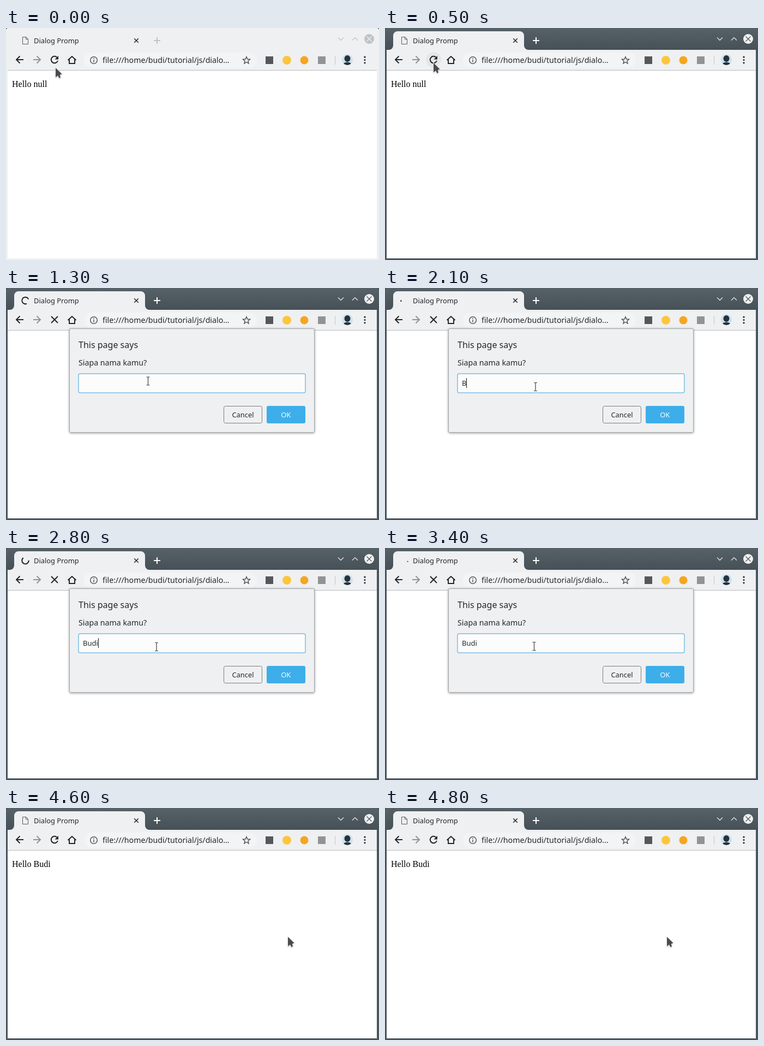
These frames come from a looping animation (684x425 px, 6000 ms). An HTML page:

```html
<!DOCTYPE html>
<html lang="id">
<head>
<meta charset="utf-8">
<title>Dialog prompt</title>
<style>
  html, body { margin: 0; width: 100%; height: 100%; overflow: hidden; background: #3a4046; }
  svg { display: block; width: 684px; height: 425px; }
  text { font-family: "Noto Sans", sans-serif; font-size: 13px; fill: #232629; white-space: pre; }
  .line { fill: none; stroke: #232629; stroke-width: 2; }
  .page { font-family: "Liberation Serif", serif; font-size: 16px; fill: #000; }
  #dialog > rect:first-child { filter: drop-shadow(0 1px 2px rgba(0, 0, 0, .4)); }
</style>
</head>
<body>
<svg viewBox="0 0 684 425">
  <defs>
    <linearGradient id="bar" x2="0" y2="1">
      <stop stop-color="#566168"/><stop offset="1" stop-color="#475057"/>
    </linearGradient>
    <clipPath id="face"><circle cx="626" cy="58" r="10"/></clipPath>
  </defs>

  <!-- window frame -->
  <path id="frame" d="M0 425V4Q0 0 4 0H680Q684 0 684 4V425Z"/>
  <g id="activeBar">
    <path d="M0 40V4Q0 0 4 0H680Q684 0 684 4V40Z" fill="url(#bar)"/>
    <path d="M7 40A8 8 0 0 0 15 32V14A8 8 0 0 1 23 6H247A8 8 0 0 1 255 14V32A8 8 0 0 0 263 40Z" fill="#eff0f1"/>
  </g>
  <rect x="3" y="40" width="677" height="37" fill="#eff0f1"/>
  <rect x="3" y="77" width="677" height="1" fill="#b8babc"/>
  <rect x="3" y="78" width="677" height="344" fill="#fff"/>

  <!-- tab -->
  <path id="pageIcon" class="line" style="stroke:#55595c;stroke-width:1" d="M30.500 16.500H37L40.500 20.500V29.500H30.500ZM36.500 16.500V20.500H40.500"/>
  <path id="spinner" class="line"/>
  <text x="51" y="28" style="font-size:12.85px">Dialog Promp</text>
  <path class="line" style="stroke-width:1.500" d="M235.200 19.200l7.600 7.600m0-7.600l-7.600 7.600"/>
  <path id="plus" class="line" d="M271 23H283M277 17V29"/>

  <!-- window buttons -->
  <path id="chevrons" class="line" style="stroke-width:1.100" d="M609 17.500l5 5 5-5M635 22.500l5-5 5 5"/>
  <circle id="closeDisc" cx="666" cy="20" r="9"/>
  <path id="closeCross" class="line" style="stroke-width:1.100" d="M661.500 15.500l9 9m0-9l-9 9"/>

  <!-- toolbar -->
  <path class="line" d="M32 58H19.500M25.500 51.500L19 58L25.500 64.500"/>
  <path class="line" style="stroke:#919394" d="M50 58H62.500M56.500 51.500L63 58L56.500 64.500"/>
  <circle id="hover" cx="89" cy="58" r="14" fill="#000"/>
  <g id="reload" transform="translate(89 58)">
    <path class="line" d="M5.900 2A6.200 6.200 0 1 1 4.400-4.400"/>
    <path d="M7-7V-.5H.5Z" fill="#232629"/>
  </g>
  <path id="stop" class="line" d="M83 52l12 12m0-12l-12 12"/>
  <path class="line" d="M113.500 59L121 52L128.500 59M116 57.500V65H126V57.500"/>
  <rect x="143" y="45" width="317" height="28" rx="14" fill="#f3f4f5"/>
  <circle class="line" cx="161" cy="59" r="6.300" style="stroke:#55595c;stroke-width:1.500"/>
  <path class="line" style="stroke:#55595c;stroke-width:1.600" d="M161 55.200V57M161 58.200V62.500"/>
  <text x="177" y="64" style="font-size:14.200px">file:///home/budi/tutorial/js/dialo…</text>
  <polygon id="star" class="line" style="stroke:#4b4f52;stroke-width:1.400"/>
  <rect x="476" y="52" width="14" height="14" fill="#55585a"/>
  <circle cx="515" cy="59" r="8" fill="#fcc63c"/>
  <circle cx="547" cy="59" r="7.500" fill="#f7a521"/>
  <rect x="572" y="52" width="14" height="14" fill="#929494"/>
  <rect x="603" y="51" width="1" height="16" fill="#c2c5c7"/>
  <g clip-path="url(#face)">
    <rect x="616" y="48" width="20" height="20" fill="#c4e5f6"/>
    <ellipse cx="626" cy="56" rx="5.500" ry="6" fill="#2c3036"/>
    <ellipse cx="626" cy="68" rx="8" ry="5.500" fill="#2c3036"/>
  </g>
  <g fill="#232629">
    <circle cx="658" cy="53.200" r="1.600"/><circle cx="658" cy="58.500" r="1.600"/><circle cx="658" cy="63.800" r="1.600"/>
  </g>

  <text id="greeting" class="page" x="11" y="108"></text>

  <g id="dialog">
    <rect x="116.500" y="74.500" width="449" height="190" rx="2.500" fill="#eff0f1" stroke="#a3a6a8"/>
    <text x="133" y="110" style="font-size:16px">This page says</text>
    <text x="133" y="142" style="font-size:14.200px">Siapa nama kamu?</text>
    <rect x="133" y="157" width="416" height="35" rx="3" fill="#fcfcfc" stroke="#79bfe4" stroke-width="1.500"/>
    <text id="entry" x="141" y="179"></text>
    <rect id="caret" y="165" width="1" height="18" fill="#111"/>
    <rect x="399.500" y="216.500" width="70" height="31" rx="3" fill="#eff0f1" stroke="#787c7f"/>
    <text x="434.500" y="237" text-anchor="middle" style="font-size:12.850px">Cancel</text>
    <rect id="ok" x="478" y="216" width="71" height="32" rx="3"/>
    <text x="513.300" y="237" text-anchor="middle" style="fill:#fcfcfc">OK</text>
  </g>

  <g id="tooltip">
    <rect x="99" y="80" width="115" height="27" fill="#323232"/>
    <text x="107" y="98" style="font-size:12.850px;fill:#fff">Reload this page</text>
  </g>

  <path id="arrow" d="M0 0V17.500L4 14.300L6.500 18.800L9 18L7.800 13L11.500 11.300Z" fill="#4b4b4d" stroke="#fff" stroke-opacity=".85" paint-order="stroke" stroke-width="1.600" style="filter:drop-shadow(0 1px 1px rgba(0,0,0,.2))"/>
  <g id="beam" fill="none">
    <path d="M-3-7.500H3M-3 7.500H3M0-7.500V7.500" stroke="#fff" stroke-width="2.600"/>
    <path d="M-3-7.500H-.8L0-7L.8-7.500H3M-3 7.500H-.8L0 7L.8 7.500H3M0-7V7" stroke="#3a3a3a" stroke-width="1.200"/>
  </g>
</svg>

<script>
const LOOP = 6000;
const NAME = "Budi";
const KEY_TIMES = [2000, 2300, 2700, 2800];
const $ = Object.fromEntries([...document.querySelectorAll("[id]")].map(el => [el.id, el]));

// Pointer position: time, x, y.
const TRACK = [
  [100, 91, 73], [200, 90, 70], [300, 89, 66], [400, 89, 64], [600, 89, 64], [700, 108, 71],
  [800, 136, 86], [1000, 192, 122], [1200, 245, 160], [1400, 276, 181], [3200, 276, 181],
  [3400, 273.5, 180], [3500, 273.5, 180], [3600, 310, 181], [3800, 385, 194], [4000, 476, 222],
  [4200, 513, 232], [4400, 513, 232], [4500, 516, 235], [4600, 517, 236]
];
// Spans in which the picture rests: start, end.
const RESTS = [[0, 200], [2400, 2700], [3100, 3300], [3400, 3600], [3600, 3800], [4800, LOOP]];

const show = (el, on) => el.setAttribute("visibility", on ? "inherit" : "hidden");
const set = (el, name, value) => el.setAttribute(name, value);

function stepTime(ms) {
  const t = Math.floor(ms / 100) * 100;
  const rest = RESTS.find(([from, to]) => t >= from && t < to);
  return rest ? rest[0] : t;
}

function pointerAt(t) {
  const i = TRACK.findIndex(key => key[0] >= t);
  if (i === 0) return TRACK[0].slice(1);
  if (i < 0) return TRACK[TRACK.length - 1].slice(1);
  const [t0, x0, y0] = TRACK[i - 1], [t1, x1, y1] = TRACK[i];
  const k = (t - t0) / (t1 - t0);
  return [x0 + (x1 - x0) * k, y0 + (y1 - y0) * k];
}

// cubic-bezier(.4, 0, .2, 1)
function fastOutSlowIn(x) {
  let lo = 0, hi = 1, u = .5;
  for (let i = 0; i < 20; i++) {
    u = (lo + hi) / 2;
    const bx = 1.2 * u * (1 - u) ** 2 + .6 * u * u * (1 - u) + u ** 3;
    if (bx < x) lo = u; else hi = u;
  }
  return 3 * u * u * (1 - u) + u ** 3;
}

// The arc grows from its tail, then shrinks towards its head, while it rotates.
function spinnerPath(t) {
  const half = 685, rotation = 1568, span = 270, radius = 6.2;
  const elapsed = t - 3350;
  const turn = Math.floor(elapsed / half);
  const growing = turn % 2 === 0;
  const moved = span * fastOutSlowIn(elapsed / half - turn);
  const tail = 88 + elapsed / rotation * 360 + Math.floor(turn / 2) * span + (growing ? 0 : moved);
  const sweep = Math.max(growing ? moved : span - moved, 12);
  const point = deg => {
    const a = deg * Math.PI / 180;
    return `${35.5 + radius * Math.sin(a)} ${23 - radius * Math.cos(a)}`;
  };
  return `M${point(tail)}A${radius} ${radius} 0 ${sweep > 180 ? 1 : 0} 1 ${point(tail + sweep)}`;
}

function drawWindow(t) {
  const active = t >= 400;
  show($.activeBar, active);
  set($.frame, "fill", active ? "#4b565d" : "#eff0f1");
  const tint = active ? "#eff0f1" : "#bfc3c6";
  $.plus.style.stroke = active ? "#fff" : tint;
  $.chevrons.style.stroke = tint;
  set($.closeDisc, "fill", tint);
  $.closeCross.style.stroke = active ? "#475057" : "#eff0f1";
}

function drawPage(t) {
  const loading = t >= 600 && t < 4600;
  show($.pageIcon, !loading);
  show($.spinner, loading);
  show($.reload, !loading);
  show($.stop, loading);
  if (loading) set($.spinner, "d", spinnerPath(t));
  const hover = t < 300 || t > 800 ? 0 : t < 600 ? .04 : .12;
  set($.hover, "opacity", hover);
  $.greeting.textContent = t < 700 ? "Hello null" : t >= 4600 ? "Hello " + NAME : "";
  set($.tooltip, "opacity", t === 700 ? .6 : t === 800 ? .38 : 0);
}

function drawDialog(t, [x, y]) {
  const open = t >= 800 && t < 4500;
  show($.dialog, open);
  if (!open) return;
  const typed = KEY_TIMES.filter(key => t >= key).length;
  $.entry.textContent = NAME.slice(0, typed);
  const since = t < KEY_TIMES[0] ? 800 : t < 2300 ? 2000 : t < 2700 ? 2300 : 2700;
  set($.caret, "x", Math.round(141 + (typed ? $.entry.getComputedTextLength() : 0)));
  show($.caret, (t - since) % 1000 < 500);
  set($.ok, "fill", x > 478 && y > 216 ? "#42a9e1" : "#3daee9");
}

function drawPointer(t, [x, y]) {
  const overField = t >= 800 && t < 4500 && x > 133 && x < 549 && y > 157 && y < 192;
  show($.arrow, !overField);
  show($.beam, overField);
  set(overField ? $.beam : $.arrow, "transform", `translate(${x} ${y})`);
}

function draw(ms) {
  const t = stepTime(ms % LOOP);
  const pointer = pointerAt(t);
  drawWindow(t);
  drawPage(t);
  drawDialog(t, pointer);
  drawPointer(t, pointer);
}

const starPoints = Array.from({ length: 10 }, (_, i) => {
  const r = i % 2 ? 3 : 6.8, a = i * Math.PI / 5;
  return `${441 + r * Math.sin(a)},${59.5 - r * Math.cos(a)}`;
});
set($.star, "points", starPoints.join(" "));

const start = performance.now();
function tick() {
  draw(performance.now() - start);
  requestAnimationFrame(tick);
}
tick();
</script>
</body>
</html>
```
